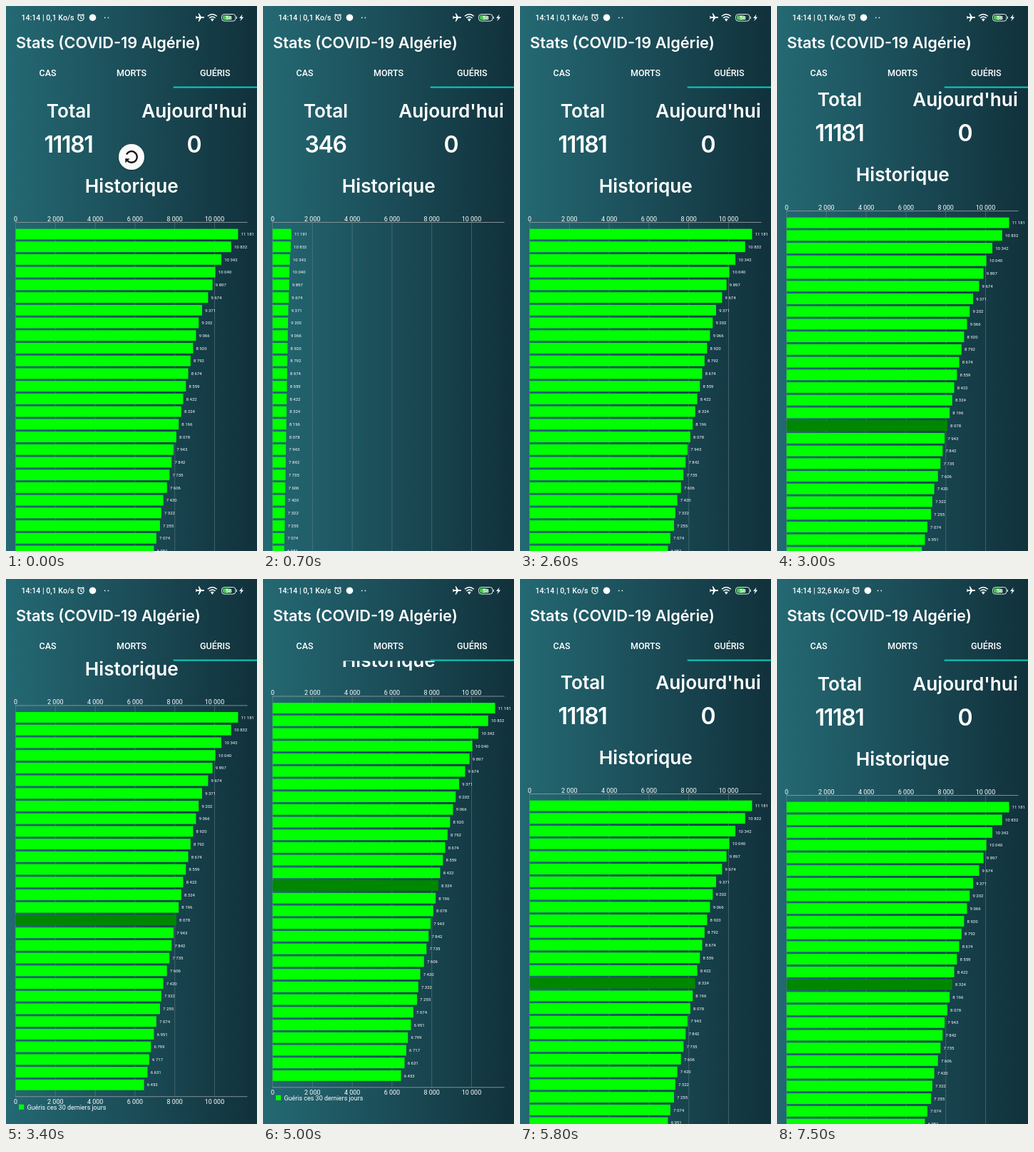
These frames come from a looping animation (352 px wide and 762 px high, 7.8 s). An HTML page:

```html
<!DOCTYPE html>
<html lang="fr">
<head>
<meta charset="utf-8">
<title>Stats</title>
<style>
  html, body { margin: 0; width: 100%; height: 100%; overflow: hidden; background: #1a4a55; }
  svg { display: block; width: 100%; height: 100%; }
  text { fill: #fff; font-family: Roboto, sans-serif; }
  .mid { text-anchor: middle; }
  .title { font: 600 21.75px Inter, sans-serif; }
  .head { font: 600 26.2px Inter, sans-serif; }
  .count { font: 600 32px Inter, sans-serif; letter-spacing: -1.3px; }
  .tab { font-size: 12.5px; font-weight: 500; }
  .status { font-size: 10.6px; font-weight: 500; }
  .axis { font-size: 8.96px; }
  .value { font-size: 6px; }
</style>
</head>
<body>
<svg id="stage" viewBox="0 0 352 762" xmlns="http://www.w3.org/2000/svg">
  <defs>
    <linearGradient id="sky">
      <stop offset="0" stop-color="#246973"/>
      <stop offset=".5" stop-color="#1b4d58"/>
      <stop offset="1" stop-color="#11313b"/>
    </linearGradient>
    <clipPath id="page"><rect y="114.5" width="352" height="648"/></clipPath>
    <filter id="shadow" x="-30%" y="-30%" width="160%" height="160%">
      <feDropShadow dx="0" dy="1" stdDeviation="1.2" flood-opacity=".35"/>
    </filter>
  </defs>
  <rect width="352" height="762" fill="url(#sky)"/>

  <g clip-path="url(#page)">
    <g id="content">
      <text class="head mid" x="88" y="156">Total</text>
      <text class="head mid" x="264" y="156">Aujourd'hui</text>
      <text class="count mid" id="total" x="87.5" y="204.5"></text>
      <text class="count mid" x="263.5" y="204.5">0</text>
      <text class="head mid" x="176.3" y="261">Historique</text>
      <g id="chart"></g>
      <rect x="18" y="860.2" width="7.2" height="7.2" fill="#0f0"/>
      <text class="axis" x="29.5" y="867.2">Guéris ces 30 derniers jours</text>
    </g>
    <g id="spinner">
      <circle r="18" fill="#fafafa" filter="url(#shadow)"/>
      <g id="ring">
        <path d="M-6.95 -3.54A7.8 7.8 0 1 1 -5.5 5.5" fill="none" stroke="#111" stroke-width="2.4"/>
        <path id="arrow" d="M-8.5 8.5L-2.5 2.5L-8.75 2.25Z" fill="#111"/>
      </g>
    </g>
  </g>

  <text class="title" x="14" y="58.5">Stats (COVID-19 Algérie)</text>
  <text class="tab mid" x="58.5" y="98.3">CAS</text>
  <text class="tab mid" x="176" y="98.3">MORTS</text>
  <text class="tab mid" x="293.3" y="98.3">GUÉRIS</text>
  <rect x="234.7" y="112.6" width="117.3" height="2" fill="#0bcfbe"/>

  <text class="status" id="status" x="21.5" y="19.8"></text>
  <g id="notices" fill="none" stroke="#fff" stroke-width="1.2">
    <circle cx="105" cy="16.5" r="4.1"/>
    <path d="M105 14V16.8L107 17.8M100.4 13.2L102.6 11.3M109.6 13.2L107.4 11.3"/>
    <circle cx="121.5" cy="16.2" r="4.8" fill="#fff" stroke="none"/>
  </g>
  <g id="dots" fill="#fff"><circle cx="138.7" cy="16.3" r=".9"/><circle cx="143.4" cy="16.3" r=".9"/></g>
  <path transform="translate(272 16) rotate(90) scale(.6) translate(-11.5 -12)" fill="#fff"
    d="M21 16v-2l-8-5V3.5C13 2.7 12.3 2 11.5 2S10 2.7 10 3.5V9l-8 5v2l8-2.5V19l-2 1.5V22l3.5-1 3.5 1v-1.5L13 19v-5.5l8 2.5z"/>
  <g fill="none" stroke="#fff" stroke-width="1.4">
    <path d="M282.8 14.2Q289.3 8.8 295.8 14.2M285 16.7Q289.3 13.2 293.6 16.7M287.2 19Q289.3 17.3 291.4 19"/>
    <circle cx="289.3" cy="20" r=".5" fill="#fff"/>
  </g>
  <rect x="304" y="13" width="10.5" height="6.6" rx="2" fill="#43c94b"/>
  <rect x="302.5" y="11.5" width="19.5" height="9.6" rx="3.6" fill="none" stroke="#dfeee4"/>
  <rect x="322.6" y="14.6" width="1.2" height="3.4" fill="#dfeee4"/>
  <text class="mid" x="312.3" y="19.2" font-size="8" font-weight="700">58</text>
  <path d="M331.6 11.5L327 17H329.8L328.3 21.2L333.2 15.4H330.3Z" fill="#fff"/>
</svg>
<script>
const LOOP = 7800, STEP = 100;
const LEFT = 13.5, UNIT = 0.0279, PITCH = 17.72, FIRST = 319, BAR = 14.8;
const TOP = 302.5, BOTTOM = 849.3, MAX_SCROLL = 138.5;
const values = [11181, 10832, 10342, 10040, 9897, 9674, 9371, 9202, 9066, 8920,
  8792, 8674, 8559, 8422, 8324, 8196, 8078, 7943, 7842, 7735,
  7606, 7420, 7322, 7255, 7074, 6951, 6799, 6717, 6631, 6453];

const $ = id => document.getElementById(id);
const spaced = n => String(n).replace(/\B(?=(\d{3})+$)/g, ' ');
const progress = (t, start, length) => Math.min(1, Math.max(0, (t - start) / length));
const cubic = p => p < 0.5 ? 4 * p ** 3 : 1 - 4 * (1 - p) ** 3;
const cosine = p => (1 - Math.cos(Math.PI * p)) / 2;
const decelerate = p => 1 - (1 - p) ** 2;

function add(parent, name, attrs, text = '') {
  const node = document.createElementNS('http://www.w3.org/2000/svg', name);
  for (const key in attrs) node.setAttribute(key, attrs[key]);
  node.textContent = text;
  return parent.appendChild(node);
}

const chart = $('chart');
for (let n = 0; n <= 10000; n += 2000) {
  const x = LEFT + n * UNIT;
  add(chart, 'path', { d: `M${x} ${TOP}V${BOTTOM}`, stroke: '#7f8f92', 'stroke-opacity': 0.55, 'stroke-width': 0.8 });
  for (const y of [TOP - 1.8, BOTTOM + 9.8]) add(chart, 'text', { class: 'axis mid', x, y }, spaced(n));
}
for (const y of [TOP, BOTTOM]) {
  add(chart, 'path', { d: `M13 ${y}H338.5`, stroke: '#8d9a9c', 'stroke-width': 0.9 });
}
const bars = values.map((value, i) => {
  const y = FIRST + i * PITCH;
  return {
    value,
    rect: add(chart, 'rect', { x: LEFT, y: y - BAR / 2, height: BAR }),
    label: add(chart, 'text', { class: 'value', y: y + 2.2 }, spaced(value))
  };
});

function drawSpinner(t) {
  const y = 211 - 56 * decelerate(progress(t, 0, 300));
  const size = 1 - progress(t, 430, 150);
  $('spinner').setAttribute('transform', `translate(176 ${y}) scale(${size})`);
  $('ring').setAttribute('transform', `rotate(${t * 0.5})`);
  $('arrow').setAttribute('opacity', 1 - progress(t, 200, 100));
}

function draw(t) {
  const growth = t < 574 ? 1 : progress(t, 574, 1500);
  const counted = t < 587 ? 1 : cosine(progress(t, 587.5, 1000));
  const picked = t < 2700 ? -1 : t < 4900 ? 16 : 14;
  const scroll = MAX_SCROLL * (cubic(progress(t, 2700, 980)) - cubic(progress(t, 5000, 944)));
  const busy = t >= 7500;

  bars.forEach(({ value, rect, label }, i) => {
    const width = value * UNIT * growth;
    rect.setAttribute('width', width);
    rect.setAttribute('fill', i === picked ? '#008700' : '#0f0');
    label.setAttribute('x', LEFT + width + 4.2);
  });
  $('total').textContent = Math.round(values[0] * counted);
  $('content').setAttribute('transform', `translate(0 ${-scroll})`);
  $('status').textContent = `14:14 | ${busy ? '32,6' : '0,1'} Ko/s`;
  $('notices').setAttribute('transform', `translate(${busy ? 5.8 : 0} 0)`);
  $('dots').setAttribute('transform', `translate(${busy ? 2.8 : 0} 0)`);
  drawSpinner(t);
}

const start = performance.now();
function tick() {
  const t = (performance.now() - start) % LOOP;
  draw(Math.floor(t / STEP) * STEP);
  requestAnimationFrame(tick);
}
tick();
</script>
</body>
</html>
```
